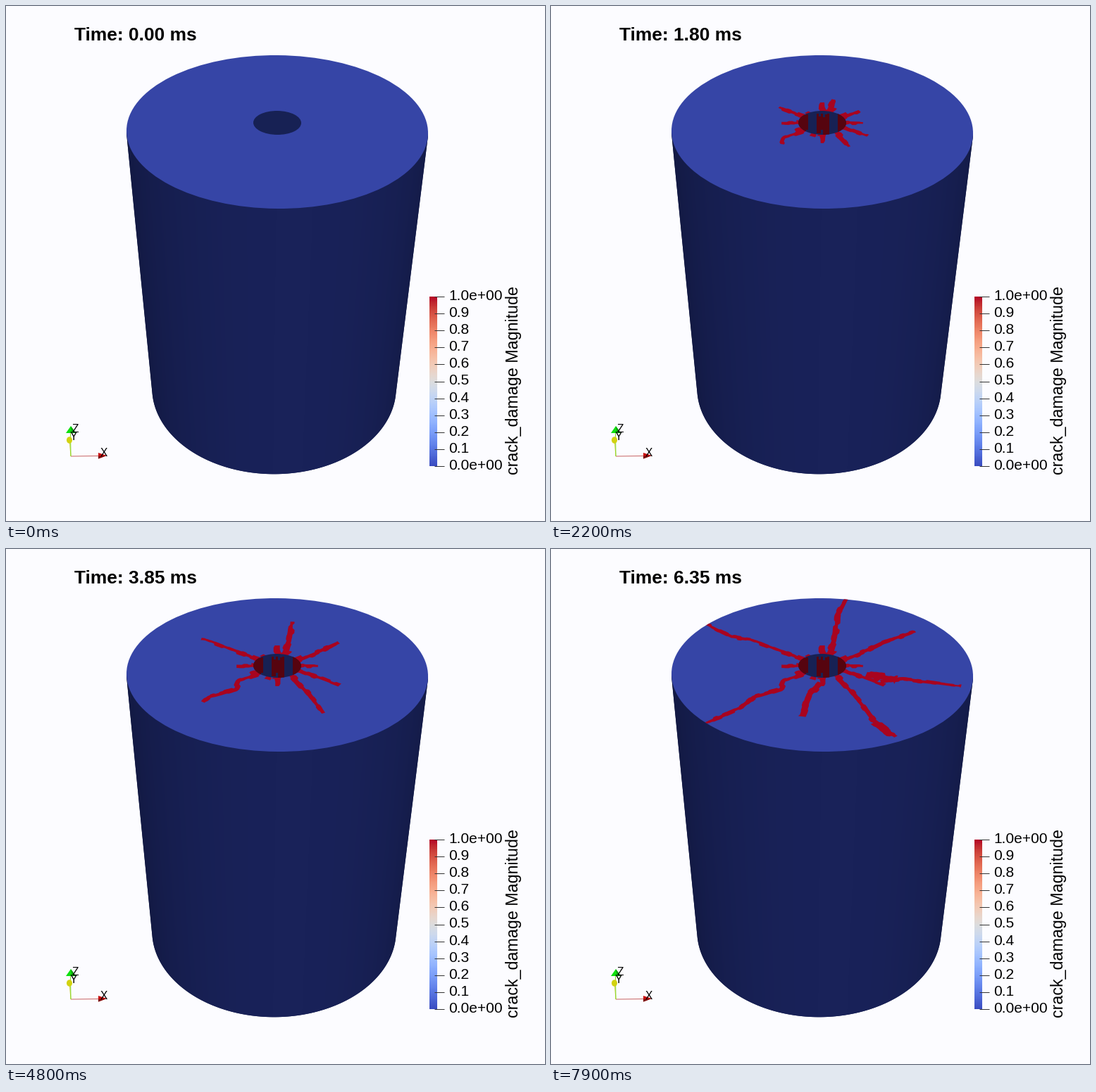
Animation, 765 px wide and 732 px high, one loop 8000 ms. Source, as a matplotlib script:

```python
import numpy as np
import matplotlib.pyplot as plt
from matplotlib.animation import FuncAnimation
from matplotlib.patches import Ellipse, Polygon, Rectangle

W, H, DPI = 765, 732, 100
FRAMES, STEP_MS = 80, 100
PX = 72 / DPI

BACK = "#fcfcff"
TOP = "#3645a6"
SIDE = np.array([25, 34, 89]) / 255
BORE = "#172154"
RED = "#a8041f"
DARK_RED = "#56040f"
TILT = 0.6  # foreshortening of crack width on the top face

plt.rcParams["font.family"] = "Liberation Sans"
rng = np.random.default_rng(7)

fig = plt.figure(figsize=(W / DPI, H / DPI), dpi=DPI, facecolor=BACK)
ax = fig.add_axes([0, 0, 1, 1])
ax.axis("off")


def label(x, y, text, size, **kw):
    return ax.text(x, y, text, fontsize=size * PX, color="black",
                   va="baseline", **kw)


def line(xs, ys, color, width=1):
    ax.plot(xs, ys, color=color, lw=width * PX, solid_capstyle="butt")


def poly(points, color, z=1):
    return ax.add_patch(Polygon(points, closed=True, fc=color, ec="none",
                                lw=0, zorder=z))


def oval(x, y, w, h, color, z, angle=0):
    return ax.add_patch(Ellipse((x, y), w, h, angle=angle, fc=color, lw=0, zorder=z))


# Cylinder wall with headlight shading
arc = np.linspace(0.07, np.pi - 0.07, 120)
base = np.column_stack([380.5 + 173.2 * np.cos(arc), 543 + 122.3 * np.sin(arc)])
wall = poly(np.vstack([[171, 178], [171.2, 183], base[::-1],
                       [598.8, 186], [599, 181]]), SIDE * 0.85)
gy, gx = np.mgrid[0:H, 0:W] + 0.5
depth = (gy - 181) / 368
u = (gx - (385 - 4.5 * depth)) / (214 - 41.3 * depth)
light = 0.77 + 0.23 * np.sqrt(np.clip(1 - u ** 2, 0, 1)) + 0.03 * u
shade = ax.imshow(light[..., None] * SIDE, extent=(0, W, H, 0), aspect="auto",
                  interpolation="nearest", zorder=1)
shade.set_clip_path(wall)

# Top face and bore
top = oval(385, 179, 428, 218, TOP, 2, angle=0.55)
bore = oval(385, 166, 68, 34, BORE, 5, angle=0.5)


class Crack:
    """Jagged band that runs along key points at an even pace, then thickens."""

    def __init__(self, start, end, *points, half=4.0):
        x, y = np.array(points, float).T
        run = np.r_[0, np.cumsum(np.hypot(np.diff(x), np.diff(y)))]
        n = max(4, int(run[-1] / 2.2))
        s = np.linspace(0, run[-1], n)
        self.t = np.linspace(start, end, n)
        self.mid = np.column_stack([np.interp(s, run, x), np.interp(s, run, y)])
        dx, dy = np.gradient(self.mid, axis=0).T
        side = np.column_stack([-dy / TILT, dx])
        side /= np.hypot(*side.T)[:, None] + 1e-9
        self.side = half * side * [1, TILT]
        self.edges = [np.repeat(rng.uniform(0.5, 1.45, n), 3)[k:n + k]
                      for k in (0, 1)]
        self.patch = poly([(0, 0)] * 3, RED, 3)
        self.patch.set_clip_path(top)

    def grow(self, now):
        n = np.count_nonzero(self.t <= now)
        self.patch.set_visible(n > 1)
        if n < 2:
            return
        age = 0.75 + 0.25 * np.clip((now - self.t[:n]) / 14, 0, 1)
        a, b = (self.mid[:n] + k * self.side[:n] * (e[:n] * age)[:, None]
                for k, e in zip((1, -1), self.edges))
        self.patch.set_xy(np.vstack([a, b[::-1]]))


def spoke(deg, reach, start, end):
    """Short straight crack outward from the bore, reach in bore radii."""
    d = np.array([34, 17]) * [np.cos(np.radians(deg)), np.sin(np.radians(deg))]
    c = np.array([385, 166])
    return Crack(start, end, c + 0.8 * d, c + reach * d)


cracks = [
    # long arms, clockwise from the top
    Crack(3, 79, (393, 152), (402, 131), (405, 112), (406, 95), (420, 70)),
    Crack(3, 79, (413, 160), (440, 148), (470, 134), (517, 117)),
    Crack(3, 33, (410, 170), (473, 194)),
    Crack(48, 79, (468, 189), (500, 185), (582, 195)),
    Crack(3, 79, (404, 178), (429, 206), (457, 243), (489, 267)),
    Crack(60, 74, (383, 190), (367, 206), (356, 238), half=5),
    Crack(3, 79, (360, 177), (331, 187), (326, 199), (288, 210), (270, 225),
          (219, 248)),
    Crack(3, 79, (357, 157), (285, 129), (257, 125), (221, 107)),
    # late wide patches
    Crack(60, 70, (447, 179), (490, 186), half=8),
    Crack(69, 77, (460, 246), (484, 265), half=7),
]
cracks += [spoke(90 * k, 1.7, 3, 18) for k in range(4)]
cracks += [spoke(30 * k + rng.uniform(-9, 9), rng.uniform(1.05, 1.35), 3, 11)
           for k in range(12)]

# Damaged strips on the bore wall, clustered in three bands
strips = []
for x in range(350, 420, 3):
    if np.cos(2 * np.pi * (x - 355) / 30) > -0.3:
        y0, y1 = 149 + rng.uniform(0, 9), 184 - rng.uniform(0, 9)
        r = ax.add_patch(Rectangle((x, y0), 3, y1 - y0, fc=DARK_RED, lw=0, zorder=6))
        r.set_clip_path(bore)
        strips.append((r, rng.integers(3, 11)))

# Colour bar
ax.imshow(np.linspace(1, 0, 256)[:, None], cmap="coolwarm", aspect="auto",
          extent=(601, 612, 654, 413), zorder=2)
for k in range(11):
    y = 654 - 24.1 * k
    line([608, 622], [y, y], "#333333")
    label(628, y + 5, f"{k / 10:.1f}" + ("e+00" if k in (0, 10) else ""), 21)
label(727, 666, "crack_damage Magnitude", 23.2, rotation=90,
      rotation_mode="anchor")

# Orientation axes
line([92, 132], [640, 639.5], "#c86464")
line([92, 90.5], [640, 620], "#c8c828")
line([92, 91.5], [640, 606], "#82dc28")
poly([(131, 635), (143, 639), (131, 643.5)], "#c80f0f", 3)
poly([(131, 640), (143, 639), (131, 643.5)], "#780a0a", 3)
poly([(92, 597), (85, 607), (99, 607)], "#0fe00f", 3)
poly([(92, 597), (94, 607), (99, 607)], "#0a960a", 3)
oval(90, 617, 8, 9.5, "#d2d20f", 3)
for x, y, name in [(139, 640, "X"), (96, 617, "Y"), (98.5, 606, "Z")]:
    label(x, y, name, 15.5, ha="center", zorder=4)

clock = label(97, 49, "", 26.4, weight="bold")
ax.set_xlim(0, W)
ax.set_ylim(H, 0)


def update(i):
    ticks = -(-8 * i // 5)
    clock.set_text(f"Time: {ticks * 0.05:.2f} ms")
    for c in cracks:
        c.grow(i)
    for r, start in strips:
        r.set_visible(i >= start)
    return []


anim = FuncAnimation(fig, update, frames=FRAMES, interval=STEP_MS,
                     init_func=lambda: update(0), repeat=True, repeat_delay=0)
plt.show()
```
